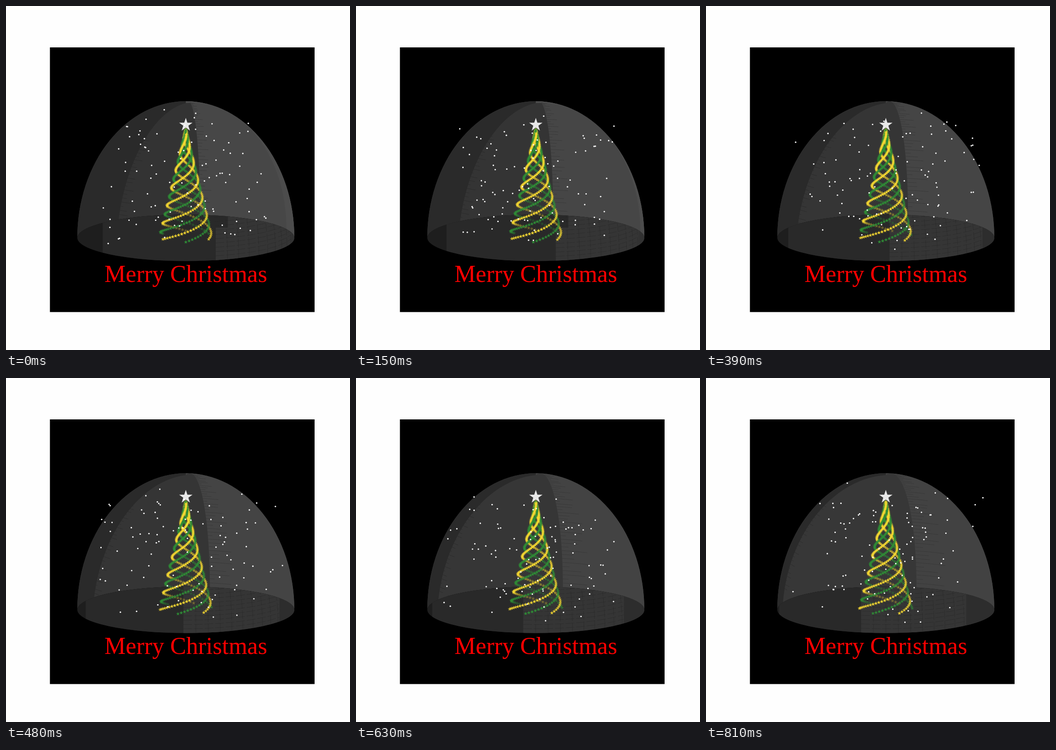
An HTML page with a canvas for the animation above (0.84 s loop, 748x748 px).

```html
<!DOCTYPE html>
<html lang="en">
<head>
<meta charset="utf-8">
<title>Snow globe</title>
<style>
  html, body { margin: 0; width: 100%; height: 100%; overflow: hidden; background: #fefefe; }
  canvas { display: block; }
</style>
</head>
<body>
<canvas id="stage" width="748" height="748"></canvas>
<script>
const ctx = document.getElementById('stage').getContext('2d');
const STEP = 30, STEPS = 28, TURN = 1.08;
const CX = 391, FLOOR = 504, RX = 236, RIM = 50.5, RISE = 293, TILT = 0.214;
const TAU = Math.PI * 2, rad = d => d * Math.PI / 180;
const mix = (a, b, u) => a + (b - a) * u;
const grey = v => { v = Math.round(v); return `rgb(${v},${v},${v})`; };

// Point on the dome; azimuth 0 faces the viewer, positive to the right.
function domePoint(lat, az) {
  const c = Math.cos(rad(lat)), a = rad(az);
  return [CX + RX * c * Math.sin(a), FLOOR + RIM * c * Math.cos(a) - RISE * Math.sin(rad(lat))];
}

function trace(points) {
  points.forEach(([x, y], i) => i ? ctx.lineTo(x, y) : ctx.moveTo(x, y));
}

function meridian(az) {
  const points = [];
  for (let lat = 0; lat <= 90; lat += 3) points.push(domePoint(lat, az));
  return points;
}

function parallel(lat, from, to) {
  const points = [];
  for (let i = 0; i <= 6; i++) points.push(domePoint(lat, mix(from, to, i / 6)));
  return points;
}

// Everything between a meridian and one outer side of the dome.
function fillSide(az, side, colour) {
  const x = CX + side * (RX + 4);
  ctx.fillStyle = colour;
  ctx.beginPath();
  trace([...meridian(az), [CX, 195], [x, 195], [x, 570]]);
  ctx.fill();
}

// Fine broken rows where two tones of the surface meet.
function hatch(from, to, latMin, latMax, colour) {
  ctx.strokeStyle = colour;
  ctx.lineWidth = 1;
  ctx.beginPath();
  for (let lat = latMin, i = 0; lat < latMax; lat += 1.8, i++) {
    trace(parallel(lat, from, mix(from, to, 0.6 + 0.4 * Math.sin(i * 2.3))));
  }
  ctx.stroke();
}

function drawUpperDome(k) {
  const u = k / (STEPS - 1), turn = k * TURN;
  const mid = grey(mix(51, 55, u)), light = grey(mix(71, 66, u));
  const left = -40 - k * 1.2, right = 180 - (7.5 + k * 0.33);
  ctx.save();
  ctx.beginPath();
  ctx.ellipse(CX, FLOOR, RX, 297, 0, Math.PI, TAU);
  ctx.ellipse(CX, FLOOR, RX, RIM, 0, 0, Math.PI, true);
  ctx.fillStyle = mid;
  ctx.fill();
  ctx.clip();
  fillSide(left, -1, grey(42));
  fillSide(right, 1, light);
  if (k < 10) fillSide(180 - (68 + k * 1.3), 1, grey(76));
  hatch(left, left + 7, 12, 56, 'rgba(38,38,38,.6)');
  hatch(right, 180 - (14 + turn * 0.7), 0, 72, 'rgba(50,50,50,.6)');
  ctx.restore();
}

function drawLowerDome(k) {
  const turn = k * TURN, edge = 16 - turn, far = 77 - turn;
  const lineX = az => CX + RX * Math.sin(rad(Math.min(az, 90)));
  ctx.save();
  ctx.beginPath();
  ctx.ellipse(CX, FLOOR, RX, RIM, 0, 0, TAU);
  ctx.fillStyle = grey(30);
  ctx.fill();
  ctx.clip();
  const bands = [[-50 - turn, 41], [edge, 53], [far, k < 12 ? 50 : 45]];
  for (const [az, tone] of bands) {
    ctx.fillStyle = grey(tone);
    ctx.fillRect(lineX(az), 440, 300, 130);
  }
  if (k < 7) {
    ctx.fillStyle = grey(41);
    ctx.fillRect(lineX(edge), 440, lineX(edge + 6.8) - lineX(edge), 42);
  }
  ctx.beginPath();
  for (let az = edge + 6.6; az < far; az += 6.6) trace(meridian(az).slice(0, 10));
  for (let lat = 1.8; lat < 20; lat += 1.8) trace(parallel(lat, edge, Math.min(far, 85)));
  ctx.strokeStyle = 'rgba(36,36,36,.55)';
  ctx.lineWidth = 0.8;
  ctx.setLineDash([19, 4]);
  ctx.stroke();
  ctx.restore();
}

function star(x, y, r) {
  ctx.beginPath();
  for (let i = 0; i < 10; i++) {
    const a = i * Math.PI / 5, q = i % 2 ? r * 0.382 : r;
    ctx.lineTo(x + q * Math.sin(a), y - q * Math.cos(a));
  }
  ctx.fill();
}

// Six strands, alternating colours, two turns from base to tip.
function drawTree(k) {
  const dots = [], count = 100;
  for (let strand = 0; strand < 6; strand++) {
    for (let i = 0; i < count; i++) {
      const h = i / count, r = 57.5 * (1 - h);
      const a = rad(strand * 60 - k * TURN) + h * 2 * TAU;
      dots.push({
        x: CX + r * Math.sin(a),
        y: 501 + r * TILT * Math.cos(a) - 234 * h,
        depth: r * Math.cos(a) + 51 * h,
        colour: strand % 2 ? '#f7d932' : '#2f8d36'
      });
    }
  }
  dots.sort((p, q) => p.depth - q.depth);
  for (const d of dots) {
    ctx.globalAlpha = mix(0.3, 1, Math.min(1, (d.depth + 57) / 114));
    ctx.fillStyle = d.colour;
    star(d.x, d.y, 4.3);
  }
  ctx.globalAlpha = 1;
  ctx.fillStyle = '#e8e8e8';
  star(CX, 258.5, 15.3);
}

function seeded(seed) {
  return () => {
    seed = (seed + 0x6D2B79F5) | 0;
    let t = Math.imul(seed ^ (seed >>> 15), 1 | seed);
    t = (t + Math.imul(t ^ (t >>> 7), 61 | t)) ^ t;
    return ((t ^ (t >>> 14)) >>> 0) / 4294967296;
  };
}

// Flakes are scattered anew in a turning box on every step.
function drawSnow(k) {
  const random = seeded(k * 977 + 41), a = rad(5 + k * TURN);
  ctx.fillStyle = '#fff';
  for (let i = 0; i < 100; i++) {
    const px = mix(-168, 168, random()), pz = mix(-168, 168, random()), h = 250 * random();
    const x = CX + px * Math.cos(a) - pz * Math.sin(a);
    const y = FLOOR + TILT * (px * Math.sin(a) + pz * Math.cos(a)) - h;
    ctx.beginPath();
    ctx.arc(x, y, 1.6, 0, TAU);
    ctx.fill();
  }
}

function draw(k) {
  ctx.fillStyle = '#fefefe';
  ctx.fillRect(0, 0, 748, 748);
  ctx.fillStyle = '#000';
  ctx.fillRect(95.5, 90, 575.5, 575.5);
  drawUpperDome(k);
  drawLowerDome(k);
  drawTree(k);
  drawSnow(k);
  ctx.fillStyle = '#f00';
  ctx.font = '52px "Liberation Serif", "Times New Roman", serif';
  ctx.fontKerning = 'none';
  ctx.textAlign = 'center';
  ctx.fillText('Merry Christmas', CX, 600);
}

const start = performance.now();
function tick() {
  draw(Math.floor((performance.now() - start) / STEP) % STEPS);
  requestAnimationFrame(tick);
}
tick();
</script>
</body>
</html>
```
